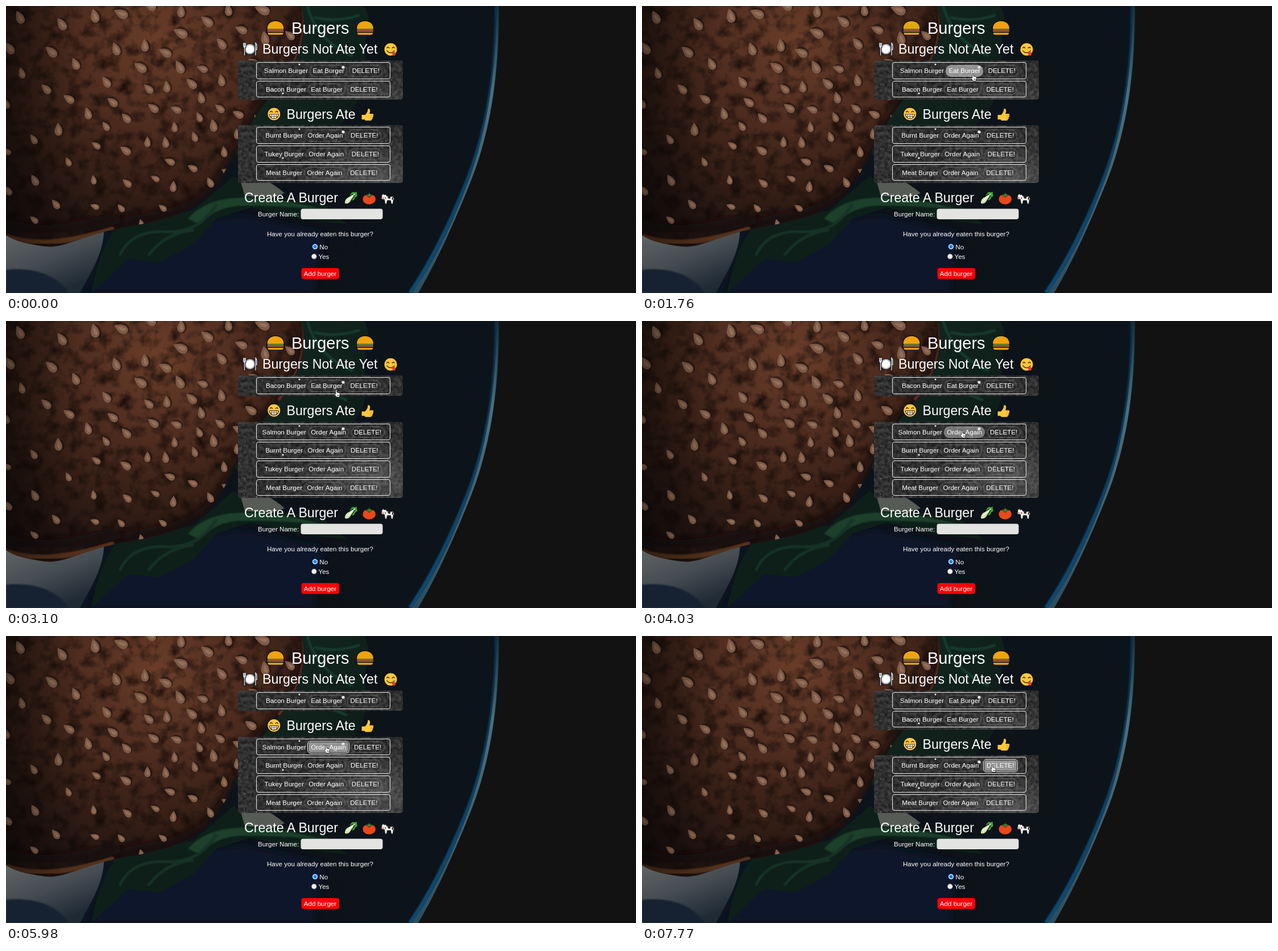
These frames come from a looping animation (1108 by 506 pixels, 8000 ms). An HTML page:

```html
<!DOCTYPE html>
<html lang="en">
<head>
<meta charset="utf-8">
<title>Burgers</title>
<style>
html, body { margin: 0; width: 100%; height: 100%; overflow: hidden; background: #111; }
body { position: relative; font: 11.6px "Liberation Sans", Arial, sans-serif; color: #fff; }
body > svg, .page, .page > svg { position: absolute; left: 0; top: 0; }
svg { display: block; pointer-events: none; }
text { fill: #fff; }
.h1 { font-size: 29px; }
.h2 { font-size: 23.2px; }
.panel { position: absolute; left: 408px; width: 290px; border-radius: 5px; overflow: hidden; background: #2d2d2d; }
.panel svg { position: absolute; left: 0; top: 0; }
.row { position: relative; box-sizing: border-box; margin: 3.2px 0 0 32px; width: 236px; height: 29.5px;
  border: 1px solid #e8e8e8; border-radius: 4px; line-height: 28px; text-align: center; white-space: nowrap; }
.btn { display: inline-block; line-height: 18.5px; padding: 0 4.25px; border-radius: 10px;
  border: 1px solid rgba(180, 180, 180, .32); background: rgba(215, 215, 215, calc(var(--lit, 0) * .6)); }
.focus { border-color: #111; border-radius: 5px; outline: 1.2px solid #fff; }
#status { position: absolute; left: 0; top: 496.5px; width: 366px; height: 10px; overflow: hidden;
  background: #dfe1e4; border-radius: 0 4px 0 0; }
#status span { position: absolute; left: -1px; top: 2px; font: 8.25px/12px "Open Sans", sans-serif; color: #444; white-space: nowrap; }
</style>
</head>
<body>
<svg width="1108" height="506" viewBox="0 0 1108 506">
  <defs>
    <radialGradient id="bun" gradientUnits="userSpaceOnUse" cx="270" cy="60" r="370">
      <stop offset="0" stop-color="#6a3d29"/><stop offset=".4" stop-color="#4f2d1f"/>
      <stop offset=".75" stop-color="#331d15"/><stop offset="1" stop-color="#201411"/>
    </radialGradient>
    <linearGradient id="plate"><stop offset="0" stop-color="#0b1522"/><stop offset=".6" stop-color="#0c1218"/>
      <stop offset="1" stop-color="#0c141b"/></linearGradient>
    <linearGradient id="rim" x2="0" y2="1"><stop offset="0" stop-color="#15323f"/><stop offset=".3" stop-color="#4d6f7c"/>
      <stop offset=".7" stop-color="#485c66"/><stop offset="1" stop-color="#2c4d5e"/></linearGradient>
    <linearGradient id="glow" x2="0" y2="1"><stop offset="0" stop-color="#0b2c40"/><stop offset=".35" stop-color="#0c3d5e"/>
      <stop offset="1" stop-color="#0d4a72"/></linearGradient>
    <linearGradient id="sauce" x2=".5" y2="1"><stop offset="0" stop-color="#686c6a"/><stop offset=".6" stop-color="#454c52"/>
      <stop offset="1" stop-color="#1f2a35"/></linearGradient>
    <linearGradient id="leaf" x2="1" y2="1"><stop offset="0" stop-color="#12291f"/><stop offset=".5" stop-color="#10211b"/>
      <stop offset="1" stop-color="#0c1716"/></linearGradient>
    <linearGradient id="shade"><stop offset="0" stop-color="#000" stop-opacity=".4"/><stop offset="1" stop-color="#000" stop-opacity="0"/></linearGradient>
    <radialGradient id="light" cx=".85" cy=".7" r=".5"><stop offset="0" stop-color="#fff" stop-opacity=".16"/>
      <stop offset="1" stop-color="#fff" stop-opacity="0"/></radialGradient>
    <filter id="soft"><feGaussianBlur stdDeviation="7"/></filter>
    <filter id="faint"><feGaussianBlur stdDeviation="1.2"/></filter>
    <filter id="grain" x="0" y="0" width="1" height="1" color-interpolation-filters="sRGB">
      <feTurbulence type="fractalNoise" baseFrequency=".16" numOctaves="4" seed="5"/>
      <feColorMatrix values=".26 0 0 0 .06  .26 0 0 0 .06  .26 0 0 0 .06  0 0 0 0 1"/>
    </filter>
    <filter id="crust" x="0" y="0" width="1" height="1" color-interpolation-filters="sRGB">
      <feTurbulence type="fractalNoise" baseFrequency=".045" numOctaves="3" seed="8"/>
      <feColorMatrix values="0 0 0 0 .07  0 0 0 0 .04  0 0 0 0 .03  1.8 0 0 0 -.75"/>
    </filter>
    <path id="bunShape" d="M0 0H520C532 55 510 112 462 163C420 212 398 280 360 330C318 374 250 382 190 394C135 405 100 428 70 424C38 420 14 414 0 404Z"/>
    <clipPath id="inBun"><use href="#bunShape"/></clipPath>

    <g id="stone">
      <rect width="290" height="140" filter="url(#grain)"/>
      <rect width="290" height="140" fill="url(#light)"/>
      <g id="specks" fill="#eee"></g>
    </g>
    <g id="burger" stroke="#111" stroke-width="1.5">
      <path d="M-15 2C-17-18 17-18 15 2Z" fill="#f0a30f"/>
      <path d="M-14.5 7H14.5Q15 12.5 10 12.5H-10Q-15 12.5-14.5 7Z" fill="#f0a30f"/>
      <rect x="-15.5" y="2.5" width="31" height="5" rx="2.5" fill="#9a5540"/>
      <path d="M-14 2.2H14" stroke="#6b9a35" stroke-width="1.6"/>
    </g>
    <g id="dish">
      <circle r="9.6" fill="#aeb4ba" stroke="#111"/><circle r="7" fill="#fff"/>
      <g fill="none">
        <path d="M-11-11V-6Q-11-3-9.5-3V11M-8-11V-6Q-8-3-9.5-3V-11M10 11V-11Q13-8 12 1H10" stroke="#111" stroke-width="3.4"/>
        <path d="M-11.3-11V-6Q-11-3-9.5-3V11M-7.7-11V-6Q-8-3-9.5-3V-11M10 11V-11Q13-8 12 1H10" stroke="#dbe4ea" stroke-width="1.4"/>
      </g>
    </g>
    <circle id="face" r="11.6" fill="#ffc83d" stroke="#111" stroke-width="1.2"/>
    <g id="yum"><use href="#face"/>
      <path d="M-7-2Q-5-6-2.5-2M2.5-2Q5-6 7-2M-7 2Q0 10 7 2" fill="none" stroke="#4a3014" stroke-width="1.5"/>
      <path d="M2 5.5Q6 4 8 5Q10 10 6 11Q2 10 2 5.5Z" fill="#ee3d33"/></g>
    <g id="grin"><use href="#face"/>
      <path d="M-7-3Q-5-7-2.5-3M2.5-3Q5-7 7-3" fill="none" stroke="#4a3014" stroke-width="1.5"/>
      <path d="M-8 .5H8Q7 8 0 8T-8 .5Z" fill="#fff" stroke="#4a3014" stroke-width="1.2"/>
      <path d="M-7.5 4H7.5M-4 1V7M0 1V8M4 1V7" stroke="#4a3014" stroke-width=".8"/></g>
    <g id="thumb" stroke="#111" stroke-width="1.2">
      <path d="M-11 0H-5Q0-4 0-11Q5-12 5-6L4-2H9Q12-1 10.5 2Q11 4 9.5 5Q10 8 8 8.5Q8 11 5 11H-4L-6 9H-11Z" fill="#ffc83d"/>
      <path d="M4 1.5H10M4 5H9M4 8.3H8" stroke="#d79a20" stroke-width=".9"/></g>
    <g id="greens" stroke="#111" stroke-width="1.2">
      <path d="M-2-5Q2-13 7-10Q12-13 11-7Q14-2 8 0Q7 6 1 5L-5 3Z" fill="#3f9d3b"/>
      <path d="M-11 7Q-10 1-3-2L3-6 6-3 1 4Q-2 11-8 11Q-12 11-11 7Z" fill="#cfe6b0"/>
      <path d="M-7 6L7-7" stroke="#fff"/></g>
    <g id="tomato" stroke="#111" stroke-width="1.1">
      <ellipse cy="1.5" rx="11.8" ry="9.8" fill="#e9481c"/>
      <path d="M-7-6L-1-7 0-11 2-7 7-6 2-4 0-1-2-4Z" fill="#3c8a35" stroke-width=".7"/></g>
    <g id="cow" stroke="#111">
      <path d="M-11-6L-8-9-6-7-3-8-2-5 10-4 12 3 10 1 9 9H6L5 3H-1L-2 9H-5L-6 1-10 0Z" fill="#f4f4f4"/>
      <path d="M0-5L5-4 4 0 0-1ZM8-3L10-3 9 2 7 1ZM-5-3L-3-2-4 1Z" fill="#222" stroke="none"/>
      <path d="M-11-3L-6-3-7 1-11 0Z" fill="#e4a8a0" stroke="none"/></g>
  </defs>

  <rect width="1108" height="506" fill="#121213"/>
  <path d="M0 0H864C865 130 844 230 812 310S744 458 708 506H0Z" fill="url(#plate)"/>
  <path d="M150 506C190 420 300 380 420 370L560 400 540 506Z" fill="#0c1829" filter="url(#soft)"/>
  <path d="M863 0C864 130 843 230 811 310S746 455 711 506" fill="none" stroke="url(#glow)" stroke-width="8" filter="url(#faint)"/>
  <path d="M866 0C868 130 849 230 817 310S760 445 725 506H714C751 455 783 390 813 310S862 130 863 0Z" fill="url(#rim)"/>

  <path d="M500 0H630C650 35 622 58 634 98C640 150 610 190 560 235C530 270 480 300 440 330L400 250Z" fill="url(#leaf)"/>
  <path d="M530 0Q545 60 610 88M542 20Q580 30 622 16M520 130Q560 120 600 140" fill="none" stroke="#193a2e" stroke-width="5" filter="url(#faint)"/>
  <path d="M150 506C160 455 172 420 195 390L330 360 400 300 450 330 560 350 600 385 520 376 430 355 370 375 330 420 270 452 215 446Z" fill="#0e1f19"/>
  <path d="M320 375Q350 340 410 338T555 358Q470 352 420 352T340 385Z" fill="#1b402c" filter="url(#faint)"/>
  <path d="M200 440Q220 395 280 398T370 350M250 440Q280 400 330 395" fill="none" stroke="#163326" stroke-width="5" filter="url(#faint)"/>
  <path d="M410 300Q445 292 490 330L470 338 420 335Z" fill="#565c55"/>
  <path d="M0 400C50 424 110 416 172 378C176 425 158 455 130 506H0Z" fill="url(#sauce)"/>
  <path d="M0 465C50 460 90 475 110 506H0Z" fill="#142230" filter="url(#faint)"/>
  <use href="#bunShape" fill="url(#bun)"/>
  <g clip-path="url(#inBun)">
    <rect width="540" height="440" filter="url(#crust)"/>
    <path d="M525 10C530 80 490 130 450 180C415 225 395 300 350 340C300 376 230 376 180 392" fill="none" stroke="#170e0b" stroke-width="22" filter="url(#soft)"/>
    <path d="M525 0C530 60 512 105 480 140" fill="none" stroke="#6a261b" stroke-width="8" filter="url(#faint)"/>
    <path d="M0 385Q70 412 200 372" fill="none" stroke="#130d0b" stroke-width="20" filter="url(#soft)"/>
    <path d="M0 406Q70 432 190 392" fill="none" stroke="#54301f" stroke-width="9" filter="url(#faint)"/>
    <g id="seeds"></g>
    <rect width="130" height="440" fill="url(#shade)"/>
  </g>
</svg>

<div id="before" class="page"></div>
<div id="after" class="page"></div>

<svg width="1108" height="506" viewBox="0 0 1108 506">
  <use href="#burger" x="474" y="39"/><use href="#burger" x="631.5" y="39"/>
  <text class="h1" x="502" y="48.5">Burgers</text>
  <use href="#dish" x="429" y="76"/><use href="#yum" x="676.5" y="76.5"/>
  <text class="h2" x="451" y="84.2">Burgers Not Ate Yet</text>
  <text class="h2" x="419" y="345.8">Create A Burger</text>
  <use href="#greens" x="606.5" y="338"/><use href="#tomato" x="638.7" y="339"/><use href="#cow" x="671.5" y="340"/>
  <text x="443" y="370.5">Burger Name:</text>
  <rect x="518.5" y="357.5" width="144" height="18.5" rx="4" fill="#f4f4f2" fill-opacity=".93"/>
  <text x="459" y="405.5">Have you already eaten this burger?</text>
  <circle cx="543.5" cy="424.3" r="4.6" fill="#fff" stroke="#1a7fd4"/>
  <circle cx="543.5" cy="424.3" r="3" fill="#1a7fd4"/>
  <text x="551.3" y="428.5">No</text>
  <circle cx="541.8" cy="441.6" r="4.5" fill="#efefef" stroke="#777" stroke-width=".8"/>
  <text x="549.5" y="446">Yes</text>
  <rect x="519.5" y="462" width="66.5" height="19.3" rx="4" fill="#f90006"/>
  <text x="523.8" y="475.8">Add burger</text>
</svg>
<div id="status"><span>Waiting for pacific-tundra-39372.herokuapp.com...</span></div>
<svg id="cursor" width="14" height="18" style="overflow:visible" fill="#fff" stroke="#111" stroke-width=".8">
  <path id="arrow" d="M.5.5V10.5L2.8 8.4 4.4 12 6 11.3 4.4 7.8H7.6Z"/>
  <path id="hand" transform="translate(-4 -1)" d="M3.9.8Q5 .8 5 2V5.8L9.2 6.8Q10.6 7.2 10.3 8.8L9.4 14H4.2L.9 9.4Q1.2 7.9 2.8 9V2Q2.8.8 3.9.8ZM6.2 10V12M7.8 10V12"/>
</svg>

<script>
const LOOP = 8000, PITCH = 32.7, TICK = 75, RELOAD = [2900, 6170];
const $ = id => document.getElementById(id);
const clamp = v => Math.max(0, Math.min(1, v));
const show = (id, on) => $(id).style.display = on ? '' : 'none';
let seed = 11;
const rand = () => (seed = seed * 16807 % 2147483647) / 2147483647;

// Seeds crowd together and shrink towards the lower right of the bun.
const seeds = [];
for (let i = 0; i < 1500; i++) {
  const x = rand() * 500, y = rand() * 385;
  const gap = 25 + Math.hypot(x - 320, y - 210) * .075;
  if (seeds.every(s => Math.hypot(s.x - x, s.y - y) > gap)) seeds.push({ x, y });
}
$('seeds').innerHTML = seeds.map(({ x, y }) => {
  const turn = 20 + rand() * 75, size = (.7 + rand() * .2) * (1 - y / 1300);
  return `<g transform="translate(${x} ${y}) rotate(${turn}) scale(${size})">
    <ellipse cx="2" cy="-3" rx="15" ry="11" fill="#1c0f0a" opacity=".55"/>
    <path d="M-16 0Q-4-11 8-9Q16-6 15 1Q13 9 3 9Q-7 7-16 0Z" fill="#7d5b48"/>
    <path d="M-8 0Q0-6 9-5Q12 0 5 3Q-2 3-8 0Z" fill="#a47e65" opacity=".6"/></g>`;
}).join('');

const dot = (x, y, r, alpha) => `<circle cx="${x}" cy="${y}" r="${r}" opacity="${alpha}"/>`;
let specks = dot(108, 7, 1.6, 1) + dot(185, 12, 2.6, 1) + dot(79, 58, 1.6, 1);
for (let i = 0; i < 60; i++) specks += dot(rand() * 290, rand() * 140, .4 + rand() * .7, .1 + rand() * .4);
$('specks').innerHTML = specks;

const row = action => name =>
  `<div class="row">${name} Burger <span class="btn">${action}</span> <span class="btn">DELETE!</span></div>`;
const panel = (top, names, action) =>
  `<div class="panel" style="top:${top}px;height:${names.length * PITCH + 3.4}px">
    <svg width="290" height="140"><use href="#stone"/></svg>${names.map(row(action)).join('')}</div>`;
function fillPage(el, waiting, eaten) {
  const shift = (waiting.length - 2) * PITCH;
  el.innerHTML = panel(96, waiting, 'Eat Burger') + panel(210.3 + shift, eaten, 'Order Again') +
    `<svg width="1108" height="506"><g transform="translate(0 ${shift})"><use href="#grin" x="471.3" y="190.5"/>
      <text class="h2" x="493.5" y="198.8">Burgers Ate</text><use href="#thumb" x="636" y="191.5"/></g></svg>`;
  return el.querySelectorAll('.btn');
}
const first = fillPage($('before'), ['Salmon', 'Bacon'], ['Burnt', 'Tukey', 'Meat']);
const second = fillPage($('after'), ['Bacon'], ['Salmon', 'Burnt', 'Tukey', 'Meat']);

const presses = [
  { btn: first[0], hover: 1370, focus: 2000, end: RELOAD[0] },
  { btn: second[2], hover: 3790, focus: 4680, end: RELOAD[1] },
  { btn: first[5], hover: 6650, focus: 7200, end: LOOP }
];

// Pointer strokes: start, end, x, y of the tip at the end.
const strokes = [
  [240, 480, 672, 276], [720, 870, 593, 138], [1210, 1450, 582, 119], [2900, 2900, 581, 121],
  [3160, 3950, 563, 193], [6170, 6570, 602, 220], [6650, 6730, 611, 220], [7450, 7530, 616, 227]
];
function pointerAt(t) {
  let x = 1115, y = 559;
  for (const [start, end, toX, toY] of strokes) {
    if (t < start) break;
    const ticks = Math.round((end - start) / TICK);
    const k = (1 + Math.floor(ticks * clamp((t - start) / (end - start || 1)))) / (ticks + 1);
    x += (toX - x) * k;
    y += (toY - y) * k;
  }
  return [Math.round(x), Math.round(y)];
}

function draw() {
  const t = performance.now() % LOOP;
  const reloaded = t >= RELOAD[0] && t < RELOAD[1];
  show('before', !reloaded);
  show('after', reloaded);
  for (const { btn, hover, focus, end } of presses) {
    const on = t >= hover && t < end;
    btn.style.setProperty('--lit', on ? clamp((t - hover) / 330) : 0);
    btn.classList.toggle('focus', on && t >= focus);
  }
  const loading = t >= 2310 && t < RELOAD[0] || t >= 5160;
  $('status').style.opacity = loading ? clamp((5980 - t) / 190) : 0;

  const [x, y] = pointerAt(t);
  const under = document.elementFromPoint(x, y);
  const onButton = !!under && under.classList.contains('btn');
  $('cursor').style.transform = `translate(${x}px, ${y}px)`;
  show('arrow', !onButton);
  show('hand', onButton);
  requestAnimationFrame(draw);
}
draw();
</script>
</body>
</html>
```
